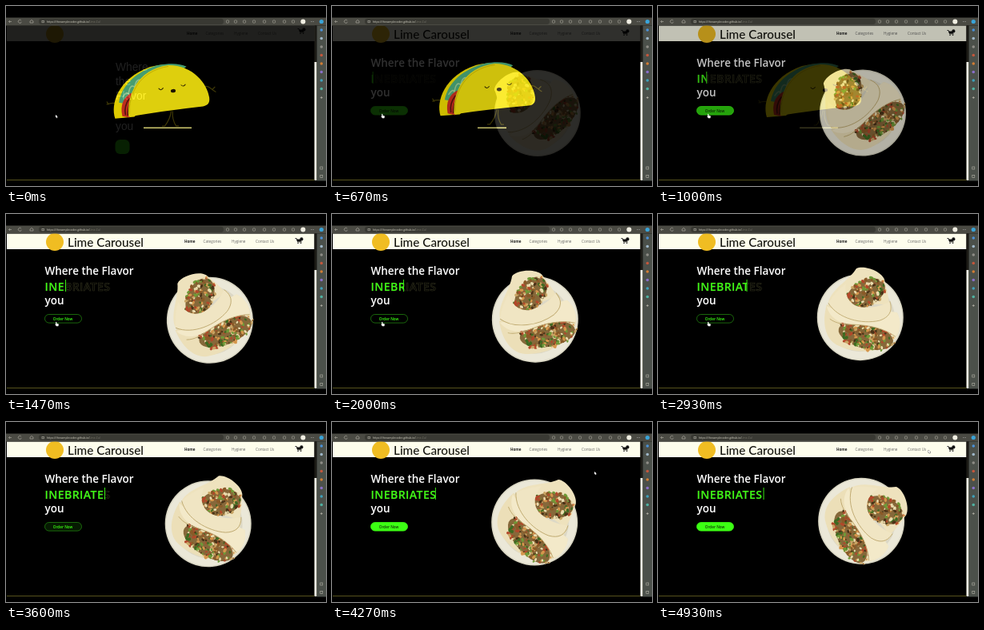
These frames come from a looping animation (400 by 225 pixels, 4.99 s). An HTML page with a canvas:

```html
<!DOCTYPE html>
<html lang="en">
<head>
<meta charset="utf-8">
<title>Landing page</title>
<style>
  html, body { margin: 0; width: 100%; height: 100%; overflow: hidden; background: #000; }
  canvas { position: absolute; left: 0; top: 0; width: 400px; height: 225px; }
</style>
</head>
<body>
<canvas id="page"></canvas>
<canvas id="loader"></canvas>
<canvas id="chrome"></canvas>
<script>
const LOOP = 4990;
const SANS = '"Open Sans", "Noto Sans", sans-serif';
const GREEN = '#3cff14', CREAM = '#fdfdec';
const dpr = window.devicePixelRatio || 1;

function layer(id) {
  const c = document.getElementById(id);
  c.width = 400 * dpr;
  c.height = 225 * dpr;
  const g = c.getContext('2d');
  g.scale(dpr, dpr);
  return g;
}
const page = layer('page'), loader = layer('loader'), chrome = layer('chrome');

// Value at time t from [time, value] steps
function track(steps, t) {
  if (t <= steps[0][0]) return steps[0][1];
  for (let i = 1; i < steps.length; i++) {
    const [t0, a] = steps[i - 1], [t1, b] = steps[i];
    if (t <= t1) return a + (b - a) * (t - t0) / (t1 - t0);
  }
  return steps[steps.length - 1][1];
}

const COVER = [[0, 0.87], [670, 0.81], [850, 0.5], [1130, 0]];
const TYPED = [[600, 0], [670, 2], [1470, 25.5], [2000, 40.5], [2930, 62], [3600, 74.5], [4200, 80], [4930, 83]];
const FILLED = [[950, 1], [1250, 0], [3550, 0], [4050, 1]];

function text(g, s, x, y, size, color, weight = 400, family = SANS, gap = 0) {
  g.font = `${weight} ${size}px ${family}`;
  g.letterSpacing = gap + 'px';
  g.fillStyle = color;
  g.fillText(s, x, y);
}
function rect(g, x, y, w, h, color) {
  g.fillStyle = color;
  g.fillRect(x, y, w, h);
}
function fill(g, d, color) {
  g.fillStyle = color;
  g.fill(new Path2D(d));
}
function line(g, d, color, width) {
  g.strokeStyle = color;
  g.lineWidth = width;
  g.stroke(new Path2D(d));
}
function oval(g, x, y, rx, ry, color, turn = 0) {
  g.beginPath();
  g.ellipse(x, y, rx, ry, turn, 0, Math.PI * 2);
  g.fillStyle = color;
  g.fill();
}
function pill(g, x, y, w, h, r) {
  g.beginPath();
  g.roundRect(x, y, w, h, r);
}

// Seeded specks inside a unit disc
let seed = 11;
const rnd = () => (seed = seed * 16807 % 2147483647) / 2147483647;
const TONES = ['#3f6a22', '#6f9a38', '#b2482a', '#d5964c', '#4a3418', '#eadcae', '#8a5a28', '#c9a565'];
const specks = n => Array.from({ length: n }, () => {
  const a = rnd() * 6.283, r = Math.sqrt(rnd()) * 1.06;
  return { x: Math.cos(a) * r, y: Math.sin(a) * r, s: 1 + rnd() * 2, turn: rnd() * 3, c: TONES[Math.floor(rnd() * TONES.length)] };
});
const stuffA = specks(130), stuffB = specks(170);

function stuffing(g, x, y, rx, ry, turn, list) {
  g.save();
  g.translate(x, y);
  g.rotate(turn);
  oval(g, 0, 0, rx, ry, '#86683a');
  for (const p of list) oval(g, p.x * rx, p.y * ry, p.s, p.s * 0.65, p.c, p.turn);
  g.restore();
}

function plate(g, t) {
  g.save();
  g.translate(259.2, 127.9);
  g.rotate((t - 2930) * 25.2e-3 * Math.PI / 180);
  g.translate(-6.4, 1.3);
  oval(g, 0, 0, 54, 54, '#d8d5c2');
  oval(g, 0, 0, 52.5, 52.5, '#ebe8d8');
  oval(g, 0, 0, 43, 43, '#dcd8c6');
  fill(g, 'M-42-16C-48 6-44 26-30 34C-8 46 30 46 44 26C52 14 50 2 46-6Z', '#ecdfb8');
  stuffing(g, 7, 23, 35, 16, 0.25, stuffB);
  fill(g, 'M-42-14C-20-4 20-12 46-6C52 4 50 18 44 24C30 14 14 10-8 9C-24 8-38 2-42-14', '#f3e9c9');
  fill(g, 'M-40-18C-36-36-14-46-5-61C4-66 26-58 30-48C33-36 36-24 36-16Z', '#eee2bd');
  stuffing(g, 7, -30, 26, 16, -0.5, stuffA);
  fill(g, 'M-40-18C-32-30-26-36-18-42C-20-28-14-16 0-13C14-11 26-14 37-20C42-8 38 0 24 4C2 9-28 2-40-18', '#f0e5c3');
  line(g, 'M-40-18C-28 2 2 9 24 4C36 0 41-8 37-20M-38 2C-30 8-20 9-8 9C14 10 30 14 44 24', '#c0ab72', 0.9);
  g.restore();
}

function header(g, ready) {
  rect(g, 1, 24.5, 384.5, 19.5, CREAM);
  oval(g, 61, 35, 11, 11, '#f0bd22');
  if (ready) text(g, 'Lime Carousel', 77, 40.5, 15.3, '#151510', 500, 'Lato, sans-serif');
  const dx = ready ? 0 : 3;
  text(g, 'Home', 223 + dx, 36, 4.6, '#222', 700);
  text(g, 'Categories', 246.5 + dx, 36, 4.6, '#666');
  text(g, 'Hygiene', 282 + dx, 36, 4.6, '#666');
  text(g, 'Contact Us', 312 + dx, 36, 4.6, '#666');
  g.save();
  g.translate(ready ? 0 : 3, ready ? 0 : -2);
  line(g, 'M361.5 30.5h1.6l1.5 4.3h5', '#111', 0.9);
  fill(g, 'M363.3 31.5h6.4l-1 2.8h-4.6z', '#111');
  oval(g, 365, 36.3, 0.8, 0.8, '#111');
  oval(g, 368.6, 36.3, 0.8, 0.8, '#111');
  oval(g, 369.4, 31.4, 2.1, 2.1, '#111');
  g.restore();
}

function button(g, t) {
  const k = track(FILLED, t);
  pill(g, 48.5, 125.5, 46, 10.6, 5.3);
  g.fillStyle = `rgba(60,255,20,${k})`;
  g.fill();
  g.strokeStyle = k > 0.5 ? GREEN : '#218010';
  g.lineWidth = 0.8;
  g.stroke();
  text(g, 'Order Now', 58.7, 132.6, 4.7, k > 0.5 ? '#123a08' : GREEN, 600);
}

function hero(g, t) {
  text(g, 'Where the Flavor', 48.5, 76, 13.5, '#fff', 600);
  text(g, 'you', 48.5, 112.5, 13.5, '#fff', 600);
  const w = track(TYPED, t), word = 'INEBRIATES';
  g.font = `600 14.1px ${SANS}`;
  g.letterSpacing = '0.4px';
  g.strokeStyle = '#34341f';
  g.lineWidth = 0.6;
  g.strokeText(word, 48.6, 95.7);
  g.save();
  g.beginPath();
  g.rect(48, 80, w + 1, 20);
  g.clip();
  text(g, word, 48.6, 95.7, 14.1, GREEN, 600, SANS, 0.4);
  g.restore();
  g.letterSpacing = '0px';
  rect(g, 48.6 + w, 82, 0.9, 15, GREEN);
  button(g, t);
}

// Layout before the styles settle
function rawHero(g) {
  const rows = [['Where', 81], ['the', 99], ['Flavor', 117], ['you', 155]];
  for (const [s, y] of rows) text(g, s, 137, y, 13.8, '#fff', 400, '"Liberation Sans", sans-serif');
  pill(g, 136.5, 167, 18, 18, 6);
  g.fillStyle = GREEN;
  g.fill();
}

function drawPage(t) {
  const g = page, ready = t >= 270;
  rect(g, 0, 0, 400, 225, '#000');
  header(g, ready);
  if (ready) {
    hero(g, t);
    plate(g, t);
  } else rawHero(g);
}

function drawLoader(t) {
  const g = loader, cover = track(COVER, t);
  g.canvas.style.opacity = cover;
  if (!cover) return;
  rect(g, 0, 24, 385.5, 194, '#000');
  const swing = Math.cos(t * 2 * Math.PI / 1340);
  const half = 24 + 6 * swing;
  rect(g, 201 + swing - half, 151.5, half * 2, 1.6, '#e9e27c');
  g.lineCap = 'round';
  g.save();
  g.translate(0, swing);
  g.translate(200, 105);
  g.rotate(-0.012 * swing);
  g.translate(-200, -105);
  const limb = '#4a4208';
  line(g, 'M206 131Q205 140 198 149h-3M208 131Q207 141 212 149h3M141 121Q133 118 126 121M128 121l-2-3', limb, 1.2);
  line(g, 'M246 102Q250 98 255 102T262 107M258 104l3-3', limb, 1.2);
  fill(g, 'M136 139C130 121 140 89 180 75C200 70 215 72 225 75L160 137Z', '#ffe900');
  fill(g, 'M141 119C145 96 165 80 190 73C206 70 218 71 226 75L158 118Q150 112 147 120Z', '#51b582');
  line(g, 'M146 112q5-8 7-3q2-14 8-9q2-12 9-8q3-9 9-7q5-7 10-6', '#a6dda0', 1.6);
  fill(g, 'M145 136C142 122 147 112 157 107L160 112L154 138Z', '#d93422');
  line(g, 'M149 134q-2-10 5-20M152 135q0-9 3-15', '#5c1711', 1.6);
  fill(g, 'M153 137C151 110 164 78 203 73C234 73 252 97 254 114C255 122 251 124 246 125Q196 130 153 137Z', '#ffee10');
  line(g, 'M154 133C153 110 166 80 203 74.5', '#d8be00', 0.8);
  line(g, 'M191 102q2.7 3.4 5.4-.4M219 98q2.7 3 5.2-.6', '#3a2d00', 1);
  oval(g, 209, 105.2, 3.1, 2.2, '#241800', -0.1);
  g.restore();
}

function drawCursor(g, t) {
  if (t < 400) return arrow(g, 62, 136);
  if (t < 3530) {
    fill(g, 'M62.2 135q.9-.8 1.2.5v1.4l1.9.4q.7.4.5 1.4l-.5 1.6h-2.3l-1.6-2.1q0-.8.8-.5z', '#fff');
    return;
  }
  if (t > 4270) arrow(g, track([[4270, 328], [4700, 338]], t), track([[4270, 62], [4700, 35]], t));
}
function arrow(g, x, y) {
  g.save();
  g.translate(x, y);
  const d = 'M0 0v3.6l.9-.8l.7 1.5l.7-.4l-.7-1.4h1.2z';
  line(g, d, '#222', 0.6);
  fill(g, d, '#fff');
  g.restore();
}

function drawChrome(t) {
  const g = chrome;
  g.clearRect(0, 0, 400, 225);
  rect(g, 0, 14.5, 400, 10, '#4a4a43');
  pill(g, 41, 15.8, 231, 7.2, 3.4);
  g.fillStyle = '#393933';
  g.fill();
  text(g, 'https://thesamplecoder.github.io/', 51, 20.8, 3.4, '#d8d6c8');
  text(g, 'Lime-Ca/', 104, 20.8, 3.4, '#77756a');
  line(g, 'M7 19.5H3.5l1.5-1.5M3.5 19.5l1.5 1.5M19 18.2a2 2 0 1 0 .3 1.6M30 21v-2l2-1.6l2 1.6v2z', '#b5b3a8', 0.6);
  g.strokeStyle = '#b5b3a8';
  g.strokeRect(45, 18.6, 2.4, 2.2);
  for (const x of [277, 287, 298, 310, 323, 335, 348, 359]) {
    g.strokeStyle = '#aaa89c';
    g.lineWidth = 0.6;
    pill(g, x - 1.6, 17.9, 3.2, 3.2, 0.8);
    g.stroke();
  }
  oval(g, 371.3, 19.4, 3, 3, '#f0eee2');
  for (const x of [381.5, 383, 384.5]) oval(g, x, 19.5, 0.4, 0.4, '#ccc');

  rect(g, 385.5, 24.5, 3, 45.5, '#1c1b16');
  rect(g, 385.5, 70, 3, 148, '#f8f7e6');
  rect(g, 388.5, 24.5, 11.5, 194, '#4b504a');
  rect(g, 1, 217, 384.5, 1, '#55521c');
  oval(g, 394.3, 19.5, 2.6, 2.6, '#3aa4d8');
  const dots = ['#4a90d8', '#9db6c8', '#8d8c86', '#c4573c', '#d07d34', '#8a6fc9', '#3f9fb8', '#4fb0a0'];
  dots.forEach((c, i) => oval(g, 394.3, 30 + i * 10.5, 1.8, 1.8, c));
  line(g, 'M392.8 114.5h3M394.3 113v3', '#c9c7bb', 0.6);
  for (const y of [202.5, 213]) {
    g.strokeStyle = '#b5b3a8';
    g.lineWidth = 0.6;
    g.strokeRect(392.8, y - 1.5, 3, 3);
  }
  drawCursor(g, t);
}

const start = performance.now();
function tick() {
  const t = (performance.now() - start) % LOOP;
  drawPage(t);
  drawLoader(t);
  drawChrome(t);
  requestAnimationFrame(tick);
}
tick();
</script>
</body>
</html>
```
